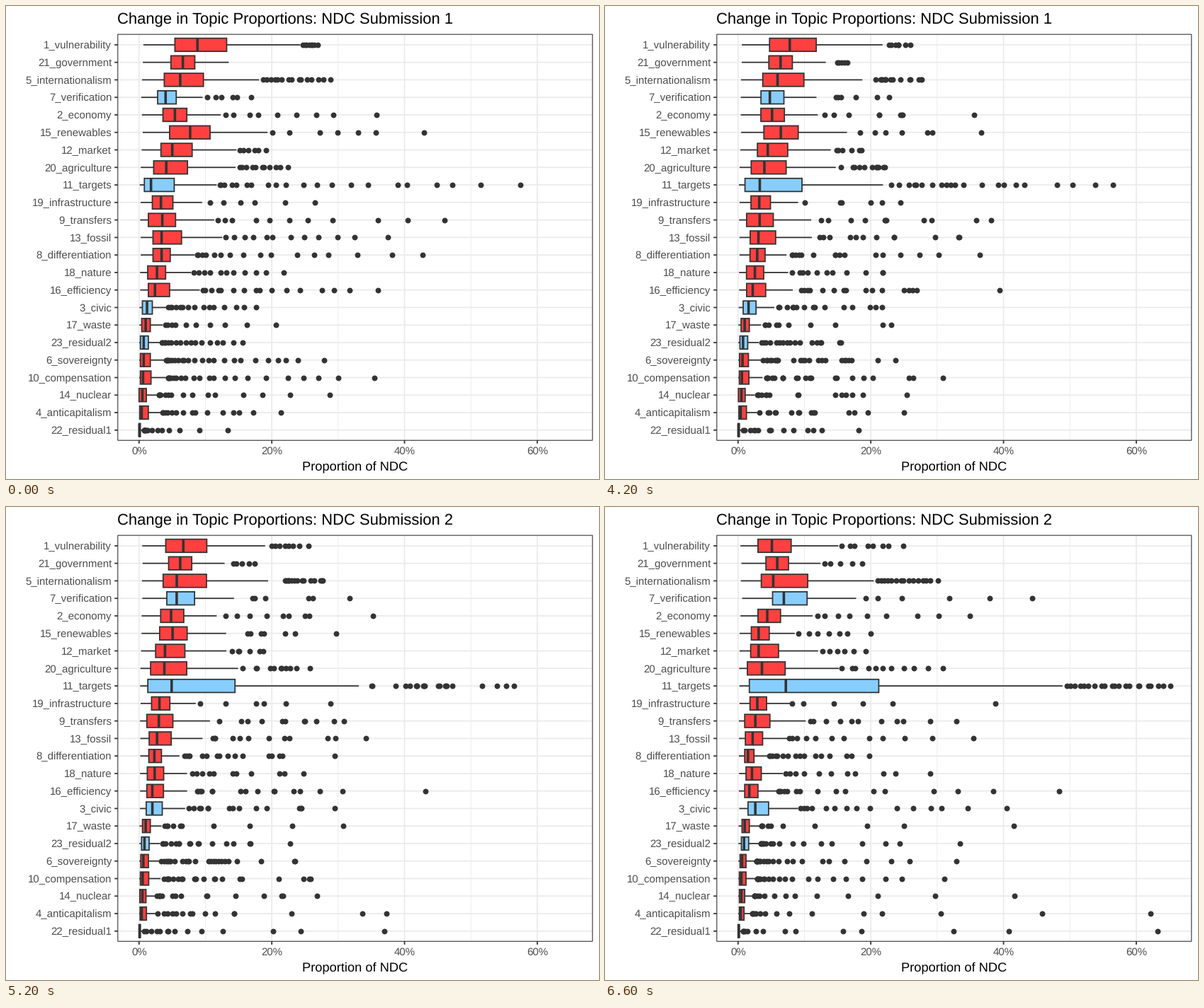
These frames come from a looping animation (837 px wide and 669 px high, 10000 ms). A matplotlib script:

```python
import numpy as np
import matplotlib.pyplot as plt
from matplotlib.animation import FuncAnimation
from matplotlib.patches import Rectangle

WIDTH, HEIGHT, DPI = 837, 669, 128
LEFT, RIGHT, TOP, BOTTOM = 157.8, 827.8, 40.1, 614.3
ZERO, PER_CENT = 187.8, 9.368
ROW_STEP, FIRST_ROW = 24.77, 54.9
FRAMES, INTERVAL = 100, 100
MOVE_START, MOVE_FRAMES = 33, 33

RED, BLUE = "#FF4040", "#87CEFF"
DARK, GRID, LABEL = "#333333", "#EBEBEB", "#4D4D4D"
AXIS_SIZE, XLABEL_SIZE, TITLE_SIZE, THIN = 15, 18.33, 21.95, 1.78

plt.rcParams.update({"font.family": "Liberation Sans", "path.snap": False,
                     "text.hinting": "none"})
rng = np.random.default_rng(4)


def pt(pixels):
    return pixels * 72 / DPI


def x_pos(percent):
    return ZERO + PER_CENT * np.asarray(percent, dtype=float)


def box_numbers(q1, median, q3):
    """Whiskers reach just short of 1.5 box lengths beyond the box."""
    return np.array([.12 * q1, q1, median, q3, q3 + 1.42 * (q3 - q1)])


def spread(count, box, farthest):
    """Outliers from the whisker to the farthest one, thinning outwards."""
    q1, q3, high = box[1], box[3], box[4]
    reach = farthest - high
    power = np.clip(1 + reach / (q3 - q1) / 12, 1, 4)
    steps = np.arange(1, count + 1) - rng.uniform(0, .8, count)
    steps[-1] = count
    return high + .3 + (reach - .3) * (steps / count) ** power


class Topic:
    def __init__(self, name, before, after, count, farthest, color=RED):
        self.name, self.color = name, color
        self.box = np.array([box_numbers(*before), box_numbers(*after)])
        end = spread(count, self.box[1], farthest[1])
        self.starts_empty = farthest[0] is None
        if self.starts_empty:
            start = np.full(count, end.mean())
        else:
            start = spread(count, self.box[0], farthest[0])
        self.dots = np.array([start, rng.permutation(end)])


# Name, quartiles before and after, outlier count, farthest outliers.
topics = [
    Topic("1_vulnerability", (5.4, 8.8, 13.2), (3, 5.1, 8), 8, (26.9, 24.9)),
    Topic("21_government", (4.8, 6.6, 8.4), (4.2, 5.9, 7.6), 5, (None, 18.7)),
    Topic("5_internationalism", (3.8, 6.2, 9.7), (3.5, 5.3, 10.5), 15, (28.8, 30.1)),
    Topic("7_verification", (2.8, 4, 5.6), (5.2, 6.9, 10.4), 6, (16.9, 44.3), BLUE),
    Topic("2_economy", (3.6, 5.4, 7.2), (3, 4.4, 6.4), 9, (35.8, 34.9)),
    Topic("15_renewables", (4.6, 7.7, 10.7), (2, 3.1, 4.7), 7, (42.9, 20)),
    Topic("12_market", (3.3, 5, 8), (1.9, 3.1, 6.1), 6, (19.1, 19.2)),
    Topic("20_agriculture", (2.2, 4.1, 7.3), (1.4, 3.6, 7.1), 11, (22.4, 30.9)),
    Topic("11_targets", (.8, 1.8, 5.3), (1.7, 7.2, 21.2), 21, (57.5, 65.1), BLUE),
    Topic("19_infrastructure", (2, 3.3, 5.1), (1.8, 2.9, 4.3), 6, (26.5, 38.8)),
    Topic("9_transfers", (1.4, 3.5, 5.5), (1, 2.6, 4.8), 11, (46, 32.9)),
    Topic("13_fossil", (2.1, 3.4, 6.4), (1.1, 2.2, 3.7), 12, (37.5, 35.5)),
    Topic("8_differentiation", (2.1, 3.4, 4.7), (1, 1.5, 2.4), 16, (42.7, 19.8)),
    Topic("18_nature", (1.3, 2.7, 4), (1.2, 2.1, 3.5), 11, (21.8, 28.9)),
    Topic("16_efficiency", (1.4, 2.4, 4.6), (1, 1.7, 3), 16, (36, 48.4)),
    Topic("3_civic", (.5, 1.2, 2), (1.5, 2.6, 4.6), 15, (17.6, 40.5), BLUE),
    Topic("17_waste", (.4, 1, 1.7), (.6, 1, 1.7), 10, (20.6, 41.5)),
    Topic("23_residual2", (.2, .7, 1.4), (.5, .9, 1.6), 17, (15.6, 33.4), BLUE),
    Topic("6_sovereignty", (.2, .7, 1.7), (.3, .6, 1.2), 24, (27.9, 32.9)),
    Topic("10_compensation", (.2, .6, 1.8), (.2, .5, 1.2), 22, (35.5, 31.1)),
    Topic("14_nuclear", (0, .5, 1.1), (.2, .5, 1), 15, (28.7, 41.7)),
    Topic("4_anticapitalism", (.1, .4, 1.4), (.2, .4, .9), 15, (21.4, 62.1)),
    Topic("22_residual1", (0, .05, .2), (0, .1, .2), 14, (13.4, 63.2)),
]
rows = FIRST_ROW + ROW_STEP * np.arange(len(topics))

fig = plt.figure(figsize=(WIDTH / DPI, HEIGHT / DPI), dpi=DPI, facecolor="white")
ax = fig.add_axes([0, 0, 1, 1])
ax.set(xlim=(0, WIDTH), ylim=(HEIGHT, 0))
ax.axis("off")


def line(xs, ys, color, width, z):
    return ax.plot(xs, ys, color=color, lw=pt(width), zorder=z,
                   solid_capstyle="butt")[0]


def text(x, y, label, size, color="black", ha="left"):
    return ax.text(x, y, label, fontsize=pt(size), color=color, ha=ha,
                   va="baseline")


for percent in range(0, 70, 10):
    major = percent % 20 == 0
    x = float(x_pos(percent))
    line([x, x], [TOP, BOTTOM], GRID, THIN if major else THIN / 2, 1)
    if major:
        line([x, x], [BOTTOM, BOTTOM + 4.6], DARK, THIN, 2)
        text(x, 633.5, f"{percent}%", AXIS_SIZE, LABEL, "center")

for y, topic in zip(rows, topics):
    line([LEFT, RIGHT], [y, y], GRID, THIN, 1)
    line([LEFT - 4.6, LEFT], [y, y], DARK, THIN, 2)
    text(149.2, y + 5.2, topic.name, AXIS_SIZE, LABEL, "right")

ax.add_patch(Rectangle((LEFT, TOP), RIGHT - LEFT, BOTTOM - TOP, fill=False,
                       ec=DARK, lw=pt(1.1), zorder=6))
text((LEFT + RIGHT) / 2, 656, "Proportion of NDC", XLABEL_SIZE, ha="center")
title = text(LEFT - .5, 25.3, "", TITLE_SIZE)

half = .375 * ROW_STEP
whiskers, boxes, medians = [], [], []
for y, topic in zip(rows, topics):
    whiskers.append(line([0, 0], [y, y], DARK, THIN, 4))
    boxes.append(ax.add_patch(Rectangle((0, y - half), 0, 2 * half, ec=DARK,
                                        fc=topic.color, lw=pt(THIN), zorder=5)))
    medians.append(line([0, 0], [y - half, y + half], DARK, 2 * THIN, 5.5))
outliers = ax.scatter([], [], s=pt(7.9) ** 2, color=DARK, linewidths=0, zorder=3)


def update(frame):
    progress = np.clip((frame - MOVE_START) / MOVE_FRAMES, 0, 1)
    weights = np.array([1 - progress, progress])
    points = []
    for y, topic, whisker, box, median in zip(rows, topics, whiskers, boxes, medians):
        low, q1, mid, q3, high = x_pos(weights @ topic.box)
        whisker.set_xdata([low, high])
        box.set_x(q1)
        box.set_width(q3 - q1)
        median.set_xdata([mid, mid])
        if progress > 0 or not topic.starts_empty:
            points += [(x, y) for x in x_pos(weights @ topic.dots)]
    outliers.set_offsets(points)
    stage = 1 if progress < .5 else 2
    title.set_text(f"Change in Topic Proportions: NDC Submission {stage}")
    return [*whiskers, *boxes, *medians, outliers, title]


anim = FuncAnimation(fig, update, frames=FRAMES, interval=INTERVAL,
                     repeat=True, repeat_delay=0, blit=False)
plt.show()
```
